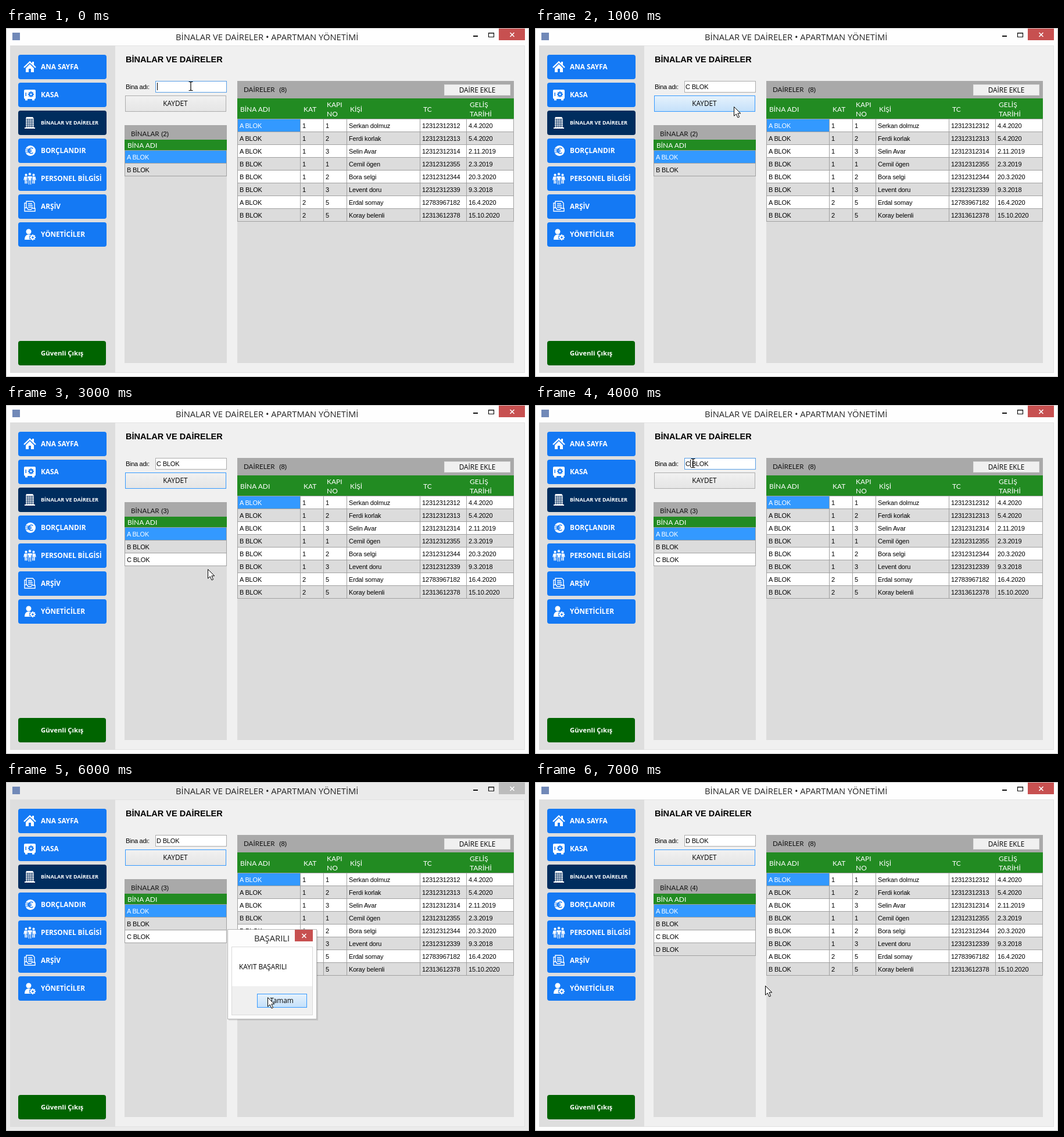
Recreate the animation shown at these times as an HTML page. Size 900x600 px, loop 8000 ms.

```html
<!DOCTYPE html>
<html lang="tr">
<head>
<meta charset="utf-8">
<title>Binalar ve daireler</title>
<style>
html, body { margin: 0; width: 100%; height: 100%; overflow: hidden; background: #fff; }
svg { display: block; width: 900px; height: 600px; }
text { white-space: pre; }
.ui { font: 11.8px "Open Sans", sans-serif; }
.title { font: 14.75px "Open Sans", sans-serif; }
.nav { font: 700 11.8px "Open Sans", sans-serif; fill: #fff; }
.cell { font: 11px "Liberation Sans", Arial, sans-serif; letter-spacing: -.17px; }
.head { font: 12px Lato, sans-serif; fill: #fff; }
.panel { font: 11.6px Lato, sans-serif; fill: #111; }
.page { font: 700 14.5px "Liberation Sans", Arial, sans-serif; }
.mid { text-anchor: middle; }
</style>
</head>
<body>
<svg id="stage" viewBox="0 0 900 600">
  <defs>
    <linearGradient id="plain" x2="0" y2="1"><stop stop-color="#f1f1f1"/><stop offset="1" stop-color="#e5e5e5"/></linearGradient>
    <linearGradient id="hover" x2="0" y2="1"><stop stop-color="#e6f2fc"/><stop offset="1" stop-color="#c4e0fa"/></linearGradient>
    <g id="arrow"><path d="M.5 .5V16.2L4.2 12.8L7 19L9.6 17.9L6.9 11.8H11.8Z" fill="#fff" stroke="#000"/></g>
    <g id="ibeam"><path d="M-3.5 -7.5H-1L0 -6.5L1 -7.5H3.5M0 -6.5V6.5M-3.5 7.5H-1L0 6.5L1 7.5H3.5" fill="none" stroke="#000" stroke-width="1.2"/></g>
  </defs>
  <g id="scene"></g>
</svg>
<script>
const GREEN = '#228b22', BLUE = '#3399ff', PANEL = '#dcdcdc', GRAY = '#a9a9a9', LINE = '#a0a0a0';

const rect = (x, y, w, h, fill, extra = '') =>
  `<rect x="${x}" y="${y}" width="${w}" height="${h}" fill="${fill}" ${extra}/>`;
const box = (x, y, w, h, fill, stroke) =>
  rect(x + .5, y + .5, w - 1, h - 1, fill, `stroke="${stroke}"`);
const text = (x, y, str, cls, extra = '') =>
  `<text x="${x}" y="${y}" class="${cls}" ${extra}>${str}</text>`;
const path = (d, extra = '') => `<path d="${d}" ${extra}/>`;
const stroke = (color, width) => `fill="none" stroke="${color}" stroke-width="${width}"`;
const range = n => [...Array(n).keys()];

function gear(x, y, r, color) {
  return `<g transform="translate(${x} ${y})"><circle r="${r}" ${stroke(color, 2)}/>` +
    range(8).map(i => rect(-1, -r - 2.4, 2, 2.4, color, `transform="rotate(${i * 45})"`)).join('') + '</g>';
}
const person = (x, y, s) => `<g transform="translate(${x} ${y}) scale(${s})"><circle cy="-7.5" r="2.4"/>` +
  path('M-3.6 -4.2H3.6L5 3H3.3L2.5 -1V10H.5V3H-.5V10H-2.5V-1L-3.3 3H-5Z') + '</g>';

const ACTIVE = '#002d5e', NAV = '#1479f4';
const icons = [
  path('M-10 1L0 -8.5L10 1', stroke('#fff', 2.4)) + path('M-7 2L0 -5L7 2V9H2V3H-2V9H-7ZM4 -9H7V-3L4 -6Z'),
  rect(-10, -9, 20, 16, '#fff', 'rx="2"') + rect(-8, 7, 4, 2.5, '#fff') + rect(4, 7, 4, 2.5, '#fff') +
    gear(2, -1, 2.6, NAV) + rect(-7.5, -4, 1.5, 6, NAV),
  path('M-6 -10H5L7 -7V9H-7V-7Z') + rect(-9, 8, 18, 2, '#fff') +
    range(5).map(i => path(`M-7 ${i * 3 - 6}H7`, stroke(ACTIVE, 1))).join('') +
    path('M-3.5 -7V8M0 -7V8M3.5 -7V8', stroke(ACTIVE, .8)),
  '<circle cx="1" r="9"/>' + path('M-10 -3H1M-10 0H0M-8 3H1', stroke(NAV, 1)) +
    path('M5.5 -3.5A4.6 4.6 0 1 0 5.5 3.5M-4 -1.3H3M-4 1.3H3', stroke(NAV, 1.6)),
  person(-6.5, 0, .85) + person(6.5, 0, .85) + `<g stroke="${NAV}" stroke-width=".8">${person(0, 0, 1.05)}</g>`,
  path('M-6 2V-9H5L8 -6V4M-3 -5H4M-3 -2H5M-3 1H5M-6 -6H-9V8H9V3H4L2 5H-3L-5 2H-9', stroke('#fff', 1.4)),
  '<circle cx="-2" cy="-5" r="4.5"/>' + path('M-9 9C-9 3 -6 0 -2 0C1 0 3 1 4 3L1 9Z') +
    `<circle cx="5" cy="5" r="6" fill="${NAV}"/>` + gear(5, 5, 2.7, '#fff')
];
const menu = ['ANA SAYFA', 'KASA', 'BİNALAR VE DAİRELER', 'BORÇLANDIR', 'PERSONEL BİLGİSİ', 'ARŞİV', 'YÖNETİCİLER'];

const columns = [398, 506, 546, 586, 712, 792, 873];
const flats = [
  'A BLOK|1|1|Serkan dolmuz|12312312312|4.4.2020',
  'A BLOK|1|2|Ferdi korlak|12312312313|5.4.2020',
  'A BLOK|1|3|Selin Avar|12312312314|2.11.2019',
  'B BLOK|1|1|Cemil ögen|12312312355|2.3.2019',
  'B BLOK|1|2|Bora selgi|12312312344|20.3.2020',
  'B BLOK|1|3|Levent doru|12312312339|9.3.2018',
  'A BLOK|2|5|Erdal somay|12783967182|16.4.2020',
  'B BLOK|2|5|Koray belenli|12313612378|15.10.2020'
].map(row => row.split('|'));

function grid(cols, top, rows) {
  return rows.map((row, r) => row.map((value, c) => {
    const x = cols[c], y = top + r * 22, selected = !r && !c;
    return box(x, y - 1, cols[c + 1] - x + 1, 23, selected ? BLUE : r % 2 ? PANEL : '#fff', LINE) +
      text(x + 4, y + 15, value, 'cell', selected ? 'fill="#fff"' : '');
  }).join('')).join('');
}

const cross = (x, y) => path(`M${x - 3.5} ${y - 3.5}l7 7m0 -7l-7 7`, stroke('#fff', 1.6));

function frame(inactive) {
  const bar = inactive ? '#ebebeb' : '#fefefe';
  return box(0, 0, 900, 600, bar, '#c3c3c3') +
    rect(11, 8, 13, 13, '#7189b8') +
    text(292, 21, 'BİNALAR VE DAİRELER • APARTMAN YÖNETİMİ', 'title', 'fill="#222"') +
    rect(804, 13, 8, 2, '#111') + path('M830.5 8.5H839.5V15.5H830.5ZM830 9H840', stroke('#111', 1.2)) +
    rect(848, 1, 45, 20, inactive ? '#bcbcbc' : '#c75050') + cross(871, 11.5) +
    box(7, 30, 886, 563, '#f0f0f0', '#e2e2e2') + rect(7, 30, 181, 563, '#dedede');
}

const sidebar = menu.map((label, i) => {
  const y = 46 + i * 48, active = i === 2;
  return rect(21, y, 152, 42, active ? ACTIVE : NAV, 'rx="4"') +
    `<g transform="translate(41 ${y + 21})" fill="#fff">${icons[i]}</g>` +
    text(60, y + (active ? 20 : 25), label, 'nav', active ? 'style="font-size:9.1px"' : '')
      .replace(`y="${y + 20}"`, `y="${y + 24}"`);
}).join('') + rect(21, 538, 151, 42, '#006400', 'rx="4"') +
  text(60, 563, 'Güvenli Çıkış', 'nav', 'style="font-size:11.4px"');

const flatPanel = rect(398, 91, 476, 485, PANEL) + rect(398, 91, 476, 30, GRAY) +
  text(409, 110, 'DAİRELER', 'panel') + text(470, 110, '(8)', 'cell') +
  box(754, 97, 114, 19, '#f0f0f0', '#e0e0e0') + text(811, 111, 'DAİRE EKLE', 'ui mid') +
  rect(398, 121, 476, 36, GREEN) +
  [[403, 144, 'BİNA ADI'], [512, 144, 'KAT'], [552, 136, 'KAPI'], [552, 152, 'NO'], [592, 144, 'KİŞİ'],
   [718, 144, 'TC'], [798, 136, 'GELİŞ'], [798, 152, 'TARİHİ']].map(h => text(...h, 'head')).join('') +
  grid(columns, 157, flats);

const buildingPanel = count => rect(204, 167, 176, 409, PANEL) + rect(204, 167, 176, 25, GRAY) +
  text(215, 186, 'BİNALAR', 'panel') + text(267, 186, `(${count})`, 'cell') +
  rect(204, 192, 176, 19, GREEN) + text(209, 206, 'BİNA ADI', 'head') +
  grid([204, 379], 211, [...'ABCD'].slice(0, count).map(c => [c + ' BLOK']));

function form({ field, caret, hover }) {
  return text(206, 59, 'BİNALAR VE DAİRELER', 'page') +
    text(206, 105, 'Bina adı:', 'cell', 'style="letter-spacing:-.3px"') +
    box(257, 91, 123, 20, '#fff', caret ? '#569de5' : '#ababab') + text(259, 105, field, 'cell') +
    (caret ? rect(caret, 94, 1, 13, '#000') : '') +
    box(205, 116, 174, 28, `url(#${hover ? 'hover' : 'plain'})`, caret ? '#acacac' : BLUE) +
    text(291.5, 134, 'KAYDET', 'ui mid');
}

const dialog = hover => rect(383, 255, 154, 155, '#000', 'opacity=".1"') +
  box(381, 253, 154, 155, '#fdfdfd', '#b5b5b5') +
  text(427, 274, 'BAŞARILI', 'title', 'fill="#222"') +
  rect(497, 254, 31, 20, '#c75050') + cross(513, 264.5) +
  box(388, 283, 140, 118, '#fff', '#dadada') + rect(389, 351, 138, 49, '#f0f0f0') +
  text(401, 322, 'KAYIT BAŞARILI', 'ui') +
  box(432, 364, 86, 24, `url(#${hover ? 'hover' : 'plain'})`, BLUE) + text(474.5, 380, 'Tamam', 'ui mid');

// One state per second
const states = [
  { count: 2, field: '', caret: 260, cursor: ['ibeam', 318, 100] },
  { count: 2, field: 'C BLOK', hover: true, cursor: ['arrow', 342, 135] },
  { count: 2, field: 'C BLOK', modal: true, cursor: ['arrow', 342, 135] },
  { count: 3, field: 'C BLOK', cursor: ['arrow', 347, 282] },
  { count: 3, field: 'C BLOK', caret: 267, cursor: ['ibeam', 272, 100] },
  { count: 3, field: 'D BLOK', hover: true, cursor: ['arrow', 293, 131] },
  { count: 3, field: 'D BLOK', modal: true, okHover: true, cursor: ['arrow', 450, 370] },
  { count: 4, field: 'D BLOK', cursor: ['arrow', 396, 350] }
];

function render(state) {
  const [shape, x, y] = state.cursor;
  return frame(state.modal) + sidebar + form(state) + buildingPanel(state.count) + flatPanel +
    (state.modal ? dialog(state.okHover) : '') + `<use href="#${shape}" x="${x}" y="${y}"/>`;
}

const scene = document.getElementById('scene');
const start = performance.now();
let shown = -1;
function tick() {
  const step = Math.floor((performance.now() - start) / 1000) % states.length;
  if (step !== shown) scene.innerHTML = render(states[shown = step]);
  requestAnimationFrame(tick);
}
tick();
</script>
</body>
</html>
```
